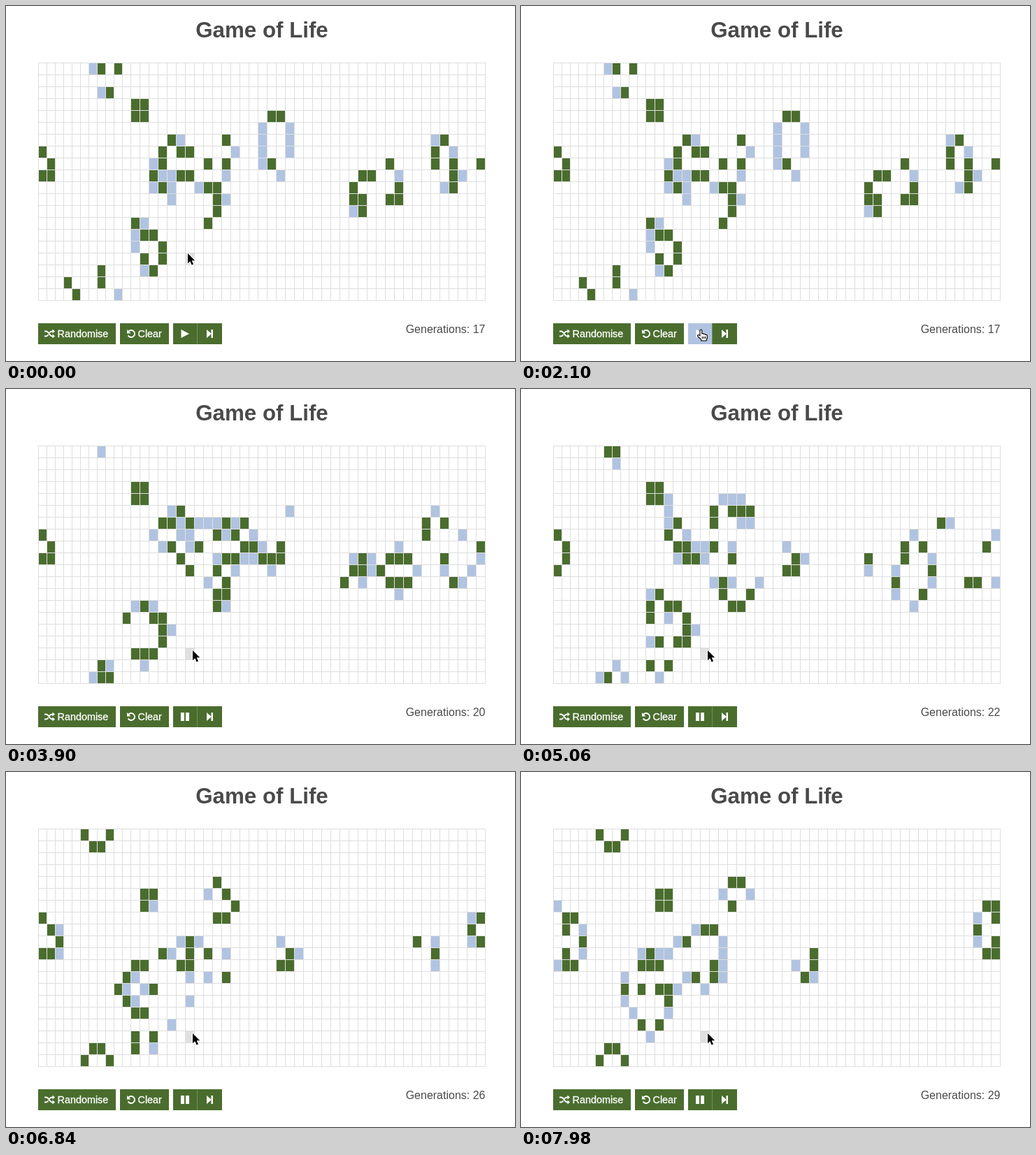
Write an HTML page with a canvas that moves like this. It is 728x508 px and loops after 8000 ms.

```html
<!DOCTYPE html>
<html lang="en">
<head>
<meta charset="utf-8">
<title>Game of Life</title>
<style>
  html, body { margin: 0; width: 100%; height: 100%; overflow: hidden; background: #fff; }
  canvas, svg { position: absolute; left: 0; top: 0; width: 728px; height: 508px; }
  text { font-family: "Liberation Sans", Arial, sans-serif; fill: #4a4a4a; }
  .label { font-size: 14.4px; fill: #fff; stroke: #fff; stroke-width: .3px; }
</style>
</head>
<body>
<canvas id="stage" width="728" height="508"></canvas>
<svg viewBox="0 0 728 508">
  <text x="366" y="45" text-anchor="middle" font-size="31.3" font-weight="bold">Game of Life</text>
  <text class="label" x="73.5" y="474">Randomise</text>
  <text class="label" x="188.5" y="474">Clear</text>
  <text id="count" x="685.5" y="468" text-anchor="end" font-size="16"></text>
</svg>
<script>
const LOOP = 8000, COLS = 50, ROWS = 20, FIRST = 17, LAST = 29;
const GREEN = '#4a6d2e', BLUE = '#b0c3e1', LINE = '#dedede', HOVER = '#e0e0e0';
const ctx = document.getElementById('stage').getContext('2d');
const count = document.getElementById('count');

// Live columns of each row; "n" marks a newborn cell.
const seed = [
  '6n 7 9', '', '7n 8', '11 12', '11 12 26 27', '25n 28n',
  '15 16n 21 25n 28n 44n 45',
  '0 14 16 17 22n 25n 28n 44 46n',
  '1 13n 14 19 21 25n 26 39 44 46 49',
  '0 1 13 14n 15n 16 17 21n 27n 36 37 40n 46 47n',
  '13n 14 15n 18n 19 20 35 40 45n 46',
  '15n 20 21n 35 36 39 40',
  '20 35n 36', '11 12n 19', '11n 12 13', '11n 14', '12 14', '7 12n 13', '3 7', '4 9n'
];

// Cell values: 0 dead, 1 newborn, 2 survivor.
function readSeed() {
  return seed.map(row => {
    const cells = new Array(COLS).fill(0);
    for (const s of row.split(' ').filter(Boolean)) cells[parseInt(s, 10)] = s.endsWith('n') ? 1 : 2;
    return cells;
  });
}

function nextGeneration(grid) {
  return grid.map((row, r) => row.map((cell, c) => {
    let n = 0;
    for (let dr = -1; dr <= 1; dr++)
      for (let dc = -1; dc <= 1; dc++)
        if ((dr || dc) && grid[(r + dr + ROWS) % ROWS][(c + dc + COLS) % COLS]) n++;
    if (cell) return n === 2 || n === 3 ? 2 : 0;
    return n === 3 ? 1 : 0;
  }));
}

const history = [readSeed()];
while (history.length <= LAST - FIRST) history.push(nextGeneration(history[history.length - 1]));

const tickTime = gen => Math.max(3240, 5145 + 430 * (gen - 23));

function generationAt(t) {
  let gen = FIRST;
  while (gen < LAST && t >= tickTime(gen + 1)) gen++;
  return gen;
}

// The first eleven columns are one pixel narrower.
const lineX = c => c <= 11 ? 46 + 12 * c : 178 + 13 * (c - 11);
const lineY = r => 81 + 17 * r;

function rect(color, x, y, w, h) {
  ctx.fillStyle = color;
  ctx.fillRect(x, y, w, h);
}

function fillCell(c, r, color) {
  rect(color, lineX(c) + 1, lineY(r) + 1, lineX(c + 1) - lineX(c) - 1, 16);
}

function drawGrid(grid, mouse) {
  for (let c = 0; c <= COLS; c++) rect(LINE, lineX(c), 81, 1, 341);
  for (let r = 0; r <= ROWS; r++) rect(LINE, 46, lineY(r), 640, 1);
  for (let r = 0; r < ROWS; r++)
    for (let c = 0; c < COLS; c++) {
      const over = mouse.x > lineX(c) && mouse.x <= lineX(c + 1) &&
                   mouse.y >= lineY(r) && mouse.y < lineY(r + 1);
      if (grid[r][c]) fillCell(c, r, grid[r][c] === 1 ? BLUE : GREEN);
      else if (over) fillCell(c, r, HOVER);
    }
}

// Mouse stops: time, x, y.
const path = [
  [560, 260, 354], [760, 253, 402], [960, 257, 447], [1380, 257, 447], [1600, 256, 462],
  [1960, 256, 462], [2100, 257, 463], [3240, 257, 463], [3800, 267, 374]
];

function mouseAt(t) {
  let i = path.findIndex(p => t < p[0]);
  if (i < 0) i = path.length;
  const a = path[Math.max(0, i - 1)], b = path[Math.min(i, path.length - 1)];
  let k = b[0] > a[0] ? (t - a[0]) / (b[0] - a[0]) : 0;
  k = k * k * (3 - 2 * k);
  return { x: Math.round(a[1] + (b[1] - a[1]) * k), y: Math.round(a[2] + (b[2] - a[2]) * k) };
}

const arrow = new Path2D('M0 0V14.2L3.3 11.2L5.6 16.6L8 15.6L5.7 10.3H10.2Z');
const hand = new Path2D('M5 10V2.4Q5 1 6.4 1T7.8 2.4V7Q10.2 6 10.7 7.7Q12.8 7 13.2 8.6' +
  'Q15.4 8.2 15.4 10V13Q15.4 14 14.3 15.2V17H6.8V15.4L2 11Q.8 9.4 2.2 8.8T5 10Z');
const knuckles = new Path2D('M8.3 11V14M10.6 11V14M12.9 11V14');
const shuffle = new Path2D('M0 3H2.5C6.5 3 7 10 11 10H12M0 10H2.5C4 10 4.8 9 5.5 7.8' +
  'M7 5.2C7.8 4 8.8 3 11 3H12');
const shuffleTips = new Path2D('M11.5 0L15 3L11.5 6ZM11.5 7L15 10L11.5 13Z');

function at(x, y, draw) {
  ctx.save();
  ctx.translate(x, y);
  draw();
  ctx.restore();
}

function triangle(x, w) {
  ctx.fill(new Path2D(`M${x} 463L${x + w} 469L${x} 475Z`));
}

function drawButtons(playing, hot) {
  rect(GREEN, 46, 454, 111, 30);
  rect(GREEN, 163, 454, 70, 30);
  rect(hot ? BLUE : GREEN, 239, 454, 34, 30);
  rect('#718d5b', 273, 454, 1, 30);
  rect(GREEN, 274, 454, 35, 30);

  ctx.fillStyle = ctx.strokeStyle = '#fff';
  ctx.lineWidth = 1.8;
  at(55, 462.5, () => { ctx.stroke(shuffle); ctx.fill(shuffleTips); });

  ctx.lineWidth = 2;
  ctx.beginPath();
  ctx.arc(179, 469, 5, -2.5, 2.6);
  ctx.stroke();
  ctx.fill(new Path2D('M173 463V468.5H178.5Z'));

  if (playing) {
    ctx.fillRect(250, 463, 5, 12);
    ctx.fillRect(257, 463, 5, 12);
  } else triangle(250.5, 11.5);
  triangle(287, 7);
  ctx.fillRect(293.5, 463, 2.5, 12);
}

function drawMouse(mouse, pointing) {
  ctx.lineJoin = 'round';
  if (pointing) {
    at(mouse.x - 6, mouse.y - 1, () => {
      ctx.fillStyle = '#fff';
      ctx.strokeStyle = '#000';
      ctx.lineWidth = 1.1;
      ctx.fill(hand);
      ctx.stroke(hand);
      ctx.stroke(knuckles);
    });
  } else {
    at(mouse.x, mouse.y, () => {
      ctx.strokeStyle = '#fff';
      ctx.lineWidth = 2;
      ctx.stroke(arrow);
      ctx.fillStyle = '#000';
      ctx.fill(arrow);
    });
  }
}

function draw(t) {
  const gen = generationAt(t), mouse = mouseAt(t);
  const hot = mouse.y >= 454 && mouse.x >= 239 && mouse.x < 273;
  rect('#fff', 0, 0, 728, 508);
  drawGrid(history[gen - FIRST], mouse);
  drawButtons(t >= 2680, hot);
  drawMouse(mouse, hot);
  const label = 'Generations: ' + gen;
  if (count.textContent !== label) count.textContent = label;
}

const start = performance.now();
function loop(now) {
  draw(Math.max(0, now - start) % LOOP);
  requestAnimationFrame(loop);
}
draw(0);
requestAnimationFrame(loop);
</script>
</body>
</html>
```
